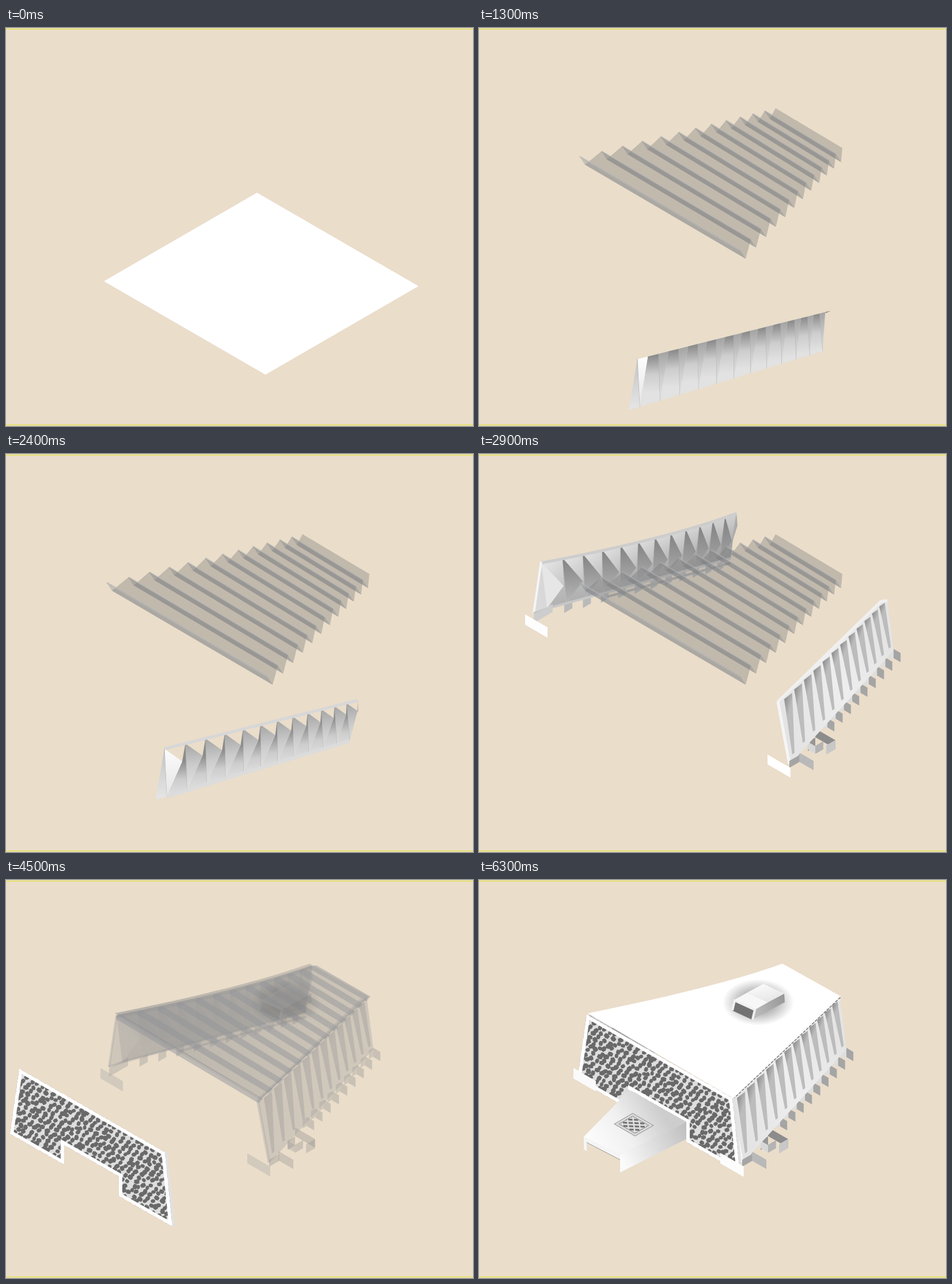
Write an HTML page with a canvas that moves like this. It is 811 px wide and 690 px high and loops after 6.8 s.

```html
<!DOCTYPE html>
<html lang="en">
<head>
<meta charset="utf-8">
<title>Folded pavilion assembly</title>
<style>
html, body { margin: 0; width: 100%; height: 100%; overflow: hidden; background: #eaddca; }
canvas { display: block; }
</style>
</head>
<body>
<canvas id="stage" width="811" height="690"></canvas>
<script>
const ctx = document.getElementById('stage').getContext('2d');
const LOOP = 6800, STEP = 100, FOLDS = 12;
let ghost = false;

// Geometry helpers
const clamp = v => Math.max(0, Math.min(1, v));
const phase = (t, from, to) => clamp((t - from) / (to - from));
const mix = (a, b, k) => [a[0] + (b[0] - a[0]) * k, a[1] + (b[1] - a[1]) * k];
const add = (p, x, y) => [p[0] + x, p[1] + y];
const rnd = n => { const v = Math.sin(n * 127.1) * 43758.5; return v - Math.floor(v); };
// Isometric move: u runs down-right, v runs up-right
const along = (p, u, v) => add(p, .866 * (u + v), .5 * (u - v));
// Fold points from a to b, spaced ever closer; cx and cy set how fast
const row = (a, b, cx, cy = cx) => i => {
  const u = i / FOLDS, w = u * (1 - u);
  return [mix(a, b, u + cx * w)[0], mix(a, b, u + cy * w)[1]];
};
const shift = (r, x, y) => i => add(r(i), x, y);
const points = r => Array.from({ length: FOLDS + 1 }, (_, i) => r(i));

// Drawing helpers
function tone(g) {
  if (typeof g !== 'number') return g;
  const v = ghost ? 100 + g * .25 : g;
  return `rgba(${v},${v},${v},${ghost ? .34 : 1})`;
}
function trace(pts, closed = true) {
  ctx.beginPath();
  for (const [x, y] of pts) ctx.lineTo(x, y);
  if (closed) ctx.closePath();
}
function poly(pts, g) { trace(pts); ctx.fillStyle = tone(g); ctx.fill(); }
function line(pts, g, w = 1, closed = false) {
  trace(pts, closed);
  ctx.strokeStyle = tone(g); ctx.lineWidth = w; ctx.stroke();
}
function ramp(a, b, ...tones) {
  const g = ctx.createLinearGradient(...a, ...b);
  tones.forEach((c, i) => g.addColorStop(i / (tones.length - 1), tone(c)));
  return g;
}
const upright = (a, b, h, g) => poly([a, b, add(b, 0, h), add(a, 0, h)], g);
const plate = (p, u, v, h, g) => upright(p, along(p, u, v), h, g);
const slab = (p, u, v) => [p, along(p, u, 0), along(p, u, v), along(p, 0, v)];
function at(x, y, faded, draw, ...args) {
  ctx.save(); ctx.translate(x, y); ghost = faded;
  draw(...args);
  ghost = false; ctx.restore();
}

// Pleated sheets: left ridges and right valleys
const SQUARE = [row([172, 415], [436, 278], .3), row([469, 590], [724, 442], .28)];
const LIFTED = SQUARE.map(r => shift(r, 0, -185));
const TAPER = [row([175, 223], [515, 139], .36), row([463, 400], [640, 222], .25, .32)];

function pleats([left, right], alpha, k = 1, pale = 0, shades = []) {
  const ridge = i => [left(i), add(right(i), -9, -14)];
  const valley = i => {
    const a = ridge(i), b = ridge(i + 1);
    return [mix(mix(a[0], b[0], .5), add(left(i), 9, 14), k), mix(mix(a[1], b[1], .5), right(i), k)];
  };
  for (let i = FOLDS - 1; i >= 0; i--) {
    const v = valley(i), r = ridge(i + 1), f = ridge(i);
    const front = [r[0], r[1], v[1], v[0]], back = [f[0], f[1], v[1], v[0]];
    if (alpha) {
      poly(front, `rgba(120,120,120,${alpha})`);
      poly(back, `rgba(130,135,145,${alpha})`);
      line(f, `rgba(180,180,182,${alpha * 1.6})`, 3);
    } else {
      const p = r[0], d = (p[0] - v[0][0]) * .5 + (v[0][1] - p[1]) * .866;
      poly(front, ramp(p, add(p, -d * .5, d * .866), 162 + pale, 192 + pale, 200 + pale));
      poly(back, 200 + pale);
      for (const s of shades) { poly(front, s); poly(back, s); }
    }
  }
}

// Trapezoid cutter
const [CUT_W, CUT_N, CUT_E, CUT_S] = [[169, 190], [517, 82], [639, 152], [453, 353]], CUT_H = 35;

// Soft dark band centred on the foot of a cutter wall
function wallShade(a, b, reach, strength) {
  const m = add(mix(a, b, .5), 0, CUT_H), len = Math.hypot(b[0] - a[0], b[1] - a[1]);
  const x = (a[1] - b[1]) / len * reach, y = (b[0] - a[0]) / len * reach;
  return ramp(add(m, -x, -y), add(m, x, y), 'rgba(0,0,0,0)', `rgba(0,0,0,${strength})`, 'rgba(0,0,0,0)');
}
function cutter() {
  const tan = 'rgba(190,180,166,.45)', edge = '#aaa59c', clear = 'rgba(205,205,205,0)';
  upright(CUT_N, CUT_E, CUT_H, tan);
  upright(CUT_W, CUT_N, CUT_H, tan);
  const a = mix(CUT_W, CUT_N, .25), b = mix(CUT_W, CUT_N, .92);
  upright(a, b, CUT_H, ramp(a, b, clear, 'rgba(205,205,205,.7)', 'rgba(205,205,205,.75)', clear));
  line([CUT_W, CUT_N, CUT_E, add(CUT_E, 0, CUT_H)], edge);
  const corner = mix(CUT_W, CUT_S, .12), tip = LIFTED[1](0);
  upright(CUT_W, corner, CUT_H, tan);
  poly([corner, CUT_S, add(CUT_S, 0, CUT_H), tip, add(corner, -12, 27)], 235);
  line([add(CUT_W, 2, 38), add(tip, -11, -10)], 255, 2);
  line([add(corner, -12, 29), tip], 195);
  upright(CUT_S, CUT_E, CUT_H, ramp(CUT_S, CUT_E, 236, 212, 'rgba(208,205,200,.9)', 'rgba(200,190,176,.4)'));
  line([CUT_W, corner], edge);
}

// Folded end wall
const SPIKE = row([275, 511], [611, 427], .33), HEM = row([279, 594], [618, 491], .27);

function endStrip(k) {
  for (let i = FOLDS - 1; i >= 0; i--) {
    const s = SPIKE(i), next = SPIKE(i + 1), b = HEM(i), f = 1 - i * .035;
    const v = mix(mix(s, next, .5), add(s, 31 * f, 22 * f), k);
    const side = i < FOLDS - 1 ? [v, next, HEM(i + 1), b] : [v, next, add(v, 1, 2)];
    poly(side, ramp(v, add(v, 4, 62), 140, 205, 226));
    poly([s, v, b], i ? ramp(s, add(s, 8, 80), 165, 205, 228) : ramp(s, b, 252, 228));
    line([s, b], 175);
  }
  poly([SPIKE(0), HEM(0), add(HEM(0), -19, 5)], ramp(SPIKE(0), HEM(0), 195, 228));
}
function stripTrim(gap) {
  at(0, -62 * gap, false, line, points(SPIKE), 215, 5);
  at(0, 45 * gap, false, line, points(HEM).slice(0, FOLDS), 220, 6);
}

// Side walls, drawn in their pulled-out places
const RAIL = row([108, 187], [447, 101], .33, 0), SILL = row([118, 268], [437, 181], .3);

function leftWall() {
  const foot = [95, 276];
  for (let i = 1; i < FOLDS; i++) plate(add(SILL(i), -4, 3), 0, 17 - i * .5, 14, 186);
  line(points(shift(SILL, 0, 8)).slice(3), 178, 4);
  poly([...points(RAIL), [449, 124], [435, 168], ...points(SILL).reverse(), foot], ramp(foot, [437, 160], 220, 190, 172));
  for (let i = 0; i < FOLDS; i++) {
    const a = RAIL(i), b = RAIL(i + 1), c = SILL(i), d = SILL(i + 1);
    const m = add(mix(b, d, .58), -2, 3), dim = i * 2;
    poly([m, b, d, c], ramp(b, d, 205 - dim, 178 - dim));
    poly([a, m, c], i ? ramp(a, c, 130, 185 - dim) : 230);
    poly([a, b, m], ramp(a, m, 232 - dim, 198 - dim));
  }
  line(points(shift(RAIL, 0, 2)), 205, 5);
  line([RAIL(0), foot], 245, 4);
  line([foot, ...points(SILL)], 200, 4);
  plate(add(foot, 0, 3), 0, 38, 14, 205);
  plate([80, 278], 45, 0, 18, 253);
}

const WEDGE = row([537, 420], [712, 250], .19), TIP = row([547, 518], [726, 322], .25);

function rightWall() {
  const head = [519, 429], heel = [539, 537], rim = [head, ...points(shift(WEDGE, -2, -6)).slice(0, FOLDS), [709, 254]];
  for (let i = 8; i >= 0; i--) {
    const p = mix([605, 458], [720, 338], i / 8);
    plate(p, 0, -9, 15, 222);
    plate(p, 14, 0, 16, 165);
  }
  // Bent bracket between the posts and the front foot
  const hook = [584, 476];
  plate(hook, 40, 0, 15, 140);
  plate(add(hook, -13, 23), 0, 15, 16, 150);
  plate(add(hook, -13, 23), 15, 0, 13, 215);
  plate(add(hook, 0, 30), 0, 16, 14, 180);
  plate(along(hook, 40, 0), 0, -18, 16, 200);
  plate([555, 517], 30, 0, 16, 185);
  poly([...rim, [720, 340], ...points(shift(TIP, 0, 12)).slice(0, FOLDS).reverse(), heel], ramp(head, [720, 340], 228, 238, 228));
  for (let i = 0; i < FOLDS; i++) {
    const a = WEDGE(i), b = TIP(i), w = 7 - i * .2, l = add(a, -w, w - 2), r = add(a, w, 1 - w);
    poly([l, r, add(b, 1, 0), add(b, -3, 3)], ramp(l, add(l, 2 * w, 4), 140, 188));
  }
  line(rim, 240, 5);
  line([head, heel], 245, 5);
  plate(add(heel, 0, -5), 0, 20, 12, 165);
  plate([501, 521], 46, 0, 17, 255);
}

// Roof parts
const EAVE_L = row([192, 235], [530, 149], .33, .05), EAVE_R = row([441, 383], [628, 206], .155);
const ROOF = [...points(shift(EAVE_L, -3, -4)), ...points(shift(EAVE_R, 1, -4)).reverse()];

function beams() {
  poly(ROOF, 'rgba(165,160,152,.2)');
  for (let i = 0; i <= FOLDS; i++) {
    const a = EAVE_L(i), b = EAVE_R(i);
    poly([a, add(a, 9, -1), add(b, 5, -4), add(b, -2, 4), add(a, -1, 6)], 'rgba(150,152,157,.5)');
  }
  line(points(EAVE_L), 'rgba(165,160,155,.7)', 2);
}
function roof() {
  poly(ROOF, ghost ? ramp([250, 220], [560, 270], 'rgba(140,142,146,.45)', 'rgba(155,155,155,.25)') : 255);
  ctx.setLineDash(ghost ? [] : [5, 2]);
  line([EAVE_L(0), add(EAVE_R(0), 0, -3)], 150);
  line(points(shift(EAVE_R, 0, -3)), 120, 1.5);
  ctx.setLineDash([]);
}
function curb() {
  const p = [440, 231], q = along(p, 34, 0);
  plate(p, 34, 0, 15, 155);
  plate(q, 0, 73, 16, ramp(q, along(q, 0, 73), 130, 175));
  for (let i = 0; i < 3; i++) poly(slab(along(q, 0, 16 + i * 20), 16, 5), 195);
  poly(slab(p, 34, 73), 255);
  const hole = slab(along(p, 2, 20), 30, 34);
  poly(hole, ramp(hole[0], hole[2], 175, 120));
  line([mix(hole[0], hole[3], .5), mix(hole[1], hole[2], .5)], 205, 3);
}
function scoop(shadow) {
  const [a, c, e] = [[443, 208], [466, 195], [494, 180]], [b, d, f] = [a, c, e].map(p => add(p, 36, 17));
  if (shadow) {
    ctx.save(); ctx.translate(485, 212); ctx.scale(1, .65);
    const g = ctx.createRadialGradient(0, 0, 25, 0, 0, 62);
    g.addColorStop(0, `rgba(60,60,60,${ghost ? .22 : .42})`); g.addColorStop(1, 'rgba(60,60,60,0)');
    ctx.fillStyle = g; ctx.fillRect(-65, -65, 130, 130); ctx.restore();
  }
  poly([a, b, add(b, -5, 17), add(a, -4, 18)], 115);
  poly([b, d, f, add(f, 1, 15), add(b, -5, 17)], ramp(b, f, 185, 150));
  poly([c, d, f, e], ramp(d, e, 230, 250));
  poly([a, b, d, c], 247);
  line([add(a, -3, 18), add(a, 1, 1), b, add(b, -4, 17)], 240, 4);
}

// Perforated front with a doorway
function facade() {
  const [tl, tr, br, bl] = [[187, 233], [440, 378], [453, 507], [171, 346]];
  const near = mix(bl, br, .67), far = mix(bl, br, .333);
  const shape = [tl, tr, br, near, add(near, 0, -34), add(far, 0, -34), far, bl];
  poly([tr, add(tr, 4, -1), add(br, 4, -2), br], 225);
  poly(shape, 222);
  ctx.save(); trace(shape); ctx.clip();
  ctx.fillStyle = tone(105);
  ctx.beginPath();
  for (let n = 0; n < 18 * 31; n++) {
    const r = Math.floor(n / 31), c = n % 31 + r % 2 / 2;
    const x = 170 + c * 9.6 + rnd(n) * 4 - 2, y = 222 + r * 8.8 + (x - 187) * .577 + rnd(n + .3) * 4;
    const turn = rnd(n + .7) * 6, size = 4 + rnd(n + .5) * 1.6;
    for (let k = 0; k < 6; k++) {
      const q = turn + k * Math.PI / 3, s = k % 3 ? size : size * .8;
      ctx[k ? 'lineTo' : 'moveTo'](x + s * Math.cos(q), y + s * Math.sin(q));
    }
  }
  ctx.fill();
  line(shape, 255, 12, true);
  ctx.restore();
}
function frontPlates() {
  plate([164, 326], 45, 0, 17, 250);
  plate([419, 473], 47, 0, 18, 253);
}

// Entrance
const [PORCH_N, PORCH_E, PORCH_S, PORCH_W] = [[259, 363], [360, 419], [245, 477], [182, 445]];

function porchFrame() {
  const top = [PORCH_N, PORCH_E, add(PORCH_S, 5, -10), add(PORCH_W, 19, -5)];
  poly(top, 225);
  line(top, 250, 4, true);
}
function porch() {
  upright(PORCH_W, PORCH_S, 8, 245);
  plate(PORCH_W, 6, 0, 22, 245);
  line([add(PORCH_W, 5, 10), add(PORCH_S, 0, 8)], 150);
  upright(PORCH_S, PORCH_E, 30, ramp(PORCH_S, PORCH_E, 250, 190));
  poly([PORCH_W, [238, 388], PORCH_N, PORCH_E, PORCH_S], ramp([300, 375], PORCH_W, 205, 240, 253));
  const vent = slab([239, 423], 37, 32), [a, b, c, d] = vent;
  poly(vent, 115);
  for (let i = 1; i < 6; i++) {
    const k = i / 3, lo = Math.max(0, k - 1), hi = Math.min(1, k);
    const cell = (u, v) => mix(mix(a, b, u), mix(d, c, u), v);
    line([cell(lo, hi), cell(hi, lo)], 225, 2.5);
    line([cell(lo, 1 - hi), cell(hi, 1 - lo)], 225, 2.5);
  }
  line(vent, 150, 5, true);
  line(vent, 220, 3, true);
}

function folding(t) {
  if (t < 500) return poly(slab([170, 439], 324, 307), 255);
  if (t < 700) return pleats(SQUARE, 0, t < 600 ? .5 : 1, 40);
  if (t < 1200) {
    pleats(SQUARE, .17);
    if (t >= 1000) return pleats(TAPER, 0);
    const cutting = t >= 800;
    pleats(LIFTED, 0, 1, 0, cutting ? [wallShade(CUT_W, CUT_N, 85, .45), wallShade(CUT_S, CUT_E, 75, .45)] : []);
    if (cutting) cutter();
    return;
  }
  if (t >= 2600) {
    const s = phase(t, 2900, 3100);
    at(84 * s, 48 * s, t >= 3200, leftWall);
    pleats(TAPER, .36);
    at(-82 * s, -47 * s, false, rightWall);
    return;
  }
  pleats(TAPER, .36);
  if (t < 1300) return;
  const k = phase(t, 1300, 1800);
  at(0, 63 * (1 - k), false, endStrip, k);
  if (t >= 1900) stripTrim(1 - phase(t, 1900, 2400));
}

function assembly(t) {
  const faded = t < 6300;
  const drop = (height, from, to) => height * (1 - phase(t, from, to));
  at(84, 48, faded, leftWall);
  if (faded) beams();
  at(-82, -47, faded, rightWall);
  if (t < 4000) at(0, drop(-100, 3300, 3500), t >= 3600, curb);
  if (t >= 4000) at(0, drop(-145, 4000, 4300), faded && t >= 4400, roof);
  if (t >= 3600) at(0, drop(-133, 3600, 3900), faded && t >= 4000, scoop, t >= 4400);
  if (t >= 4400) {
    const out = t < 4600 ? 1 : 0;
    at(-164 * out, 94 * out, faded && t >= 4700, facade);
  }
  if (!faded) frontPlates();
  if (faded && t >= 4700) at(0, drop(221, 4700, 5200), t >= 5400, porchFrame);
  if (t >= 5600) at(drop(-146, 5600, 6100), drop(157, 5600, 6100), false, porch);
}

function render(now) {
  const t = Math.floor(now % LOOP / STEP) * STEP;
  ctx.fillStyle = '#eaddca'; ctx.fillRect(0, 0, 811, 690);
  (t < 3300 ? folding : assembly)(t);
  ctx.fillStyle = '#e6e173';
  ctx.fillRect(0, 1, 811, 2); ctx.fillRect(0, 687, 811, 2);
}

const start = performance.now();
function tick() {
  render(performance.now() - start);
  requestAnimationFrame(tick);
}
tick();
</script>
</body>
</html>
```
